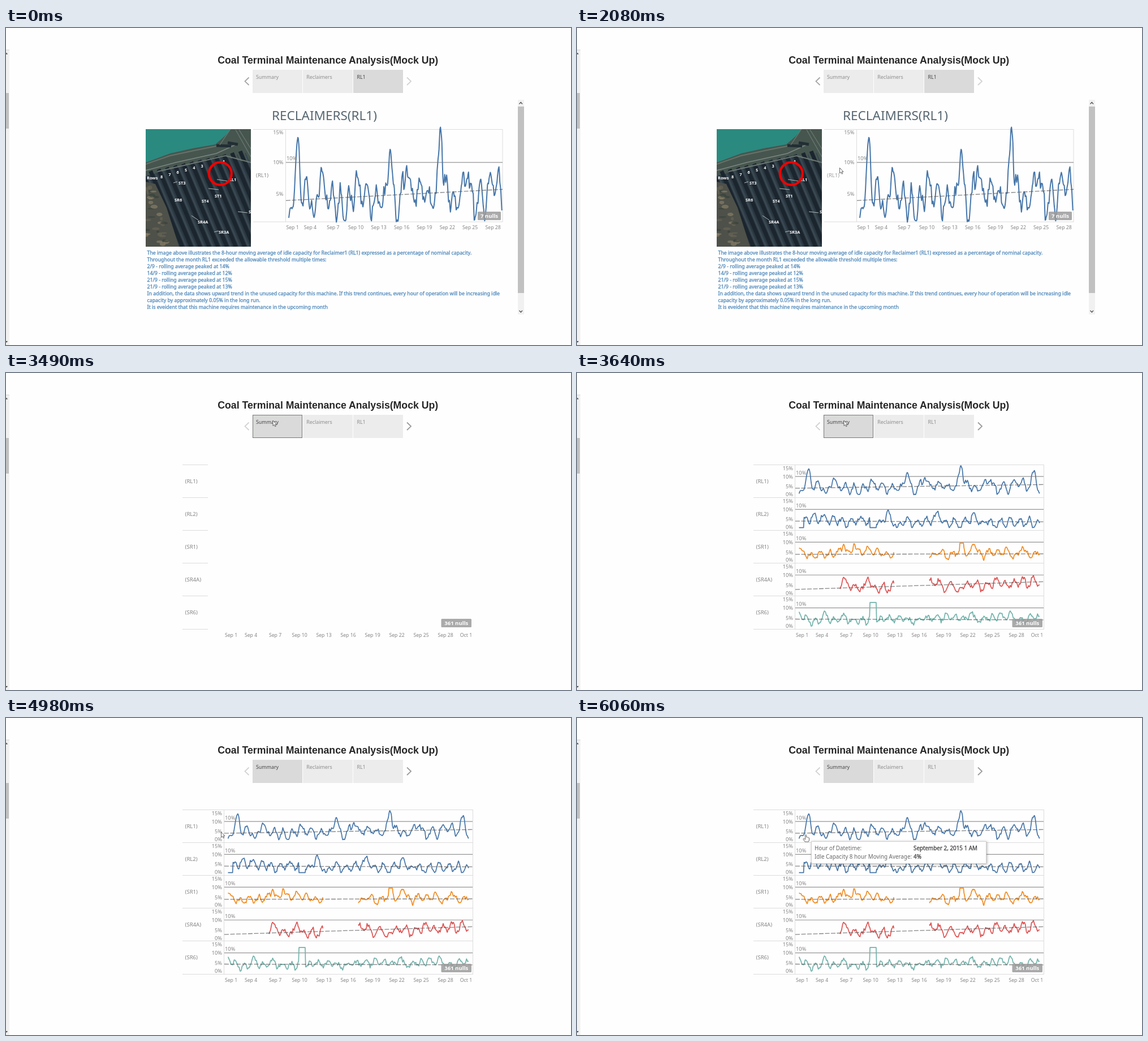
Write an HTML page that moves like this. It is 999 px wide and 561 px high and loops after 8000 ms.

```html
<!DOCTYPE html>
<html lang="en">
<head>
<meta charset="utf-8">
<title>Maintenance dashboard</title>
<style>
html, body { margin: 0; width: 100%; height: 100%; overflow: hidden; background: #fefefe; }
svg { display: block; width: 999px; height: 561px; }
text { font-family: "Noto Sans", "Open Sans", sans-serif; font-size: 8.7px; fill: #858585; white-space: pre; }
.title { font: bold 17.68px "Liberation Sans", Arial, sans-serif; fill: #262626; }
.head { font-size: 22.5px; fill: #566670; }
.tab { font-size: 8.9px; }
.row { font-size: 9.6px; }
.axis { font-size: 9.3px; }
.note { font-size: 8.8px; fill: #5089bb; stroke: #5089bb; stroke-width: .3px; }
.map { font-size: 7.4px; font-weight: bold; fill: #fff; }
.badge { font-size: 9.6px; font-weight: bold; fill: #fff; }
.tip { font-size: 9.85px; fill: #666; }
.strong { fill: #444; stroke: #444; stroke-width: .3px; }
</style>
</head>
<body>
<svg id="stage" viewBox="0 0 999 561"></svg>
<script>
const LOOP = 8000, GRID = '#dcdcdc';
const stage = document.getElementById('stage');

function el(tag, attrs, parent = stage) {
  const node = document.createElementNS('http://www.w3.org/2000/svg', tag);
  for (const k in attrs) node.setAttribute(k, attrs[k]);
  return parent.appendChild(node);
}
const group = parent => el('g', {}, parent);
const rect = (p, x, y, w, h, fill, more) => el('rect', { x, y, width: w, height: h, fill, ...more }, p);
const path = (p, d, stroke, width = 1, more) =>
  el('path', { d, fill: 'none', stroke, 'stroke-width': width, ...more }, p);
const shape = (p, d, fill) => el('path', { d, fill }, p);
function text(p, str, x, y, cls = '', anchor = 'start') {
  const node = el('text', { x, y, class: cls, 'text-anchor': anchor }, p);
  node.textContent = str;
  return node;
}
const show = (node, on) => node.style.display = on ? '' : 'none';
const mix = (a, b, f) => a + (b - a) * f;

function hash(i, seed) {
  const v = Math.sin(i * 127.1 + seed * 311.7) * 43758.5453;
  return v - Math.floor(v);
}
function noise(x, seed) {
  const i = Math.floor(x);
  return mix(hash(i, seed), hash(i + 1, seed), x - i) - .5;
}

// keys: [day, percent] turning points; flats: [from, to, percent]; gaps: [from, to]
const series = [
  { name: 'RL1', color: '#4676a9', seed: 1, trend: [3.9, 5.8], flats: [], gaps: [],
    keys: [[0, 1.9], [1.15, 14.5], [3.3, .8], [4.4, 9.4], [7.3, 1], [9, 8.4], [13.35, 12.3], [14.2, .6],
      [15.5, 8.8], [19.95, 15.8], [22.1, 2.4], [23.5, 8], [24.5, .8], [25.75, .7], [26.4, 8], [28.95, 13.4], [29.6, 1.5]] },
  { name: 'RL2', color: '#4676a9', seed: 2, trend: [3.85, 3.46], flats: [[0, .6, .4], [8.75, 9.55, .4]], gaps: [],
    keys: [[1.8, 7.5], [3, 7.4], [11, 9], [12.1, 1], [17, 9], [19.8, .7], [21.5, 8.5], [24.1, .5]] },
  { name: 'SR1', color: '#f28c22', seed: 3, trend: [3.65, 3.9], flats: [[19.8, 20.3, 9.5]], gaps: [[11.7, 16]],
    keys: [[0, 7.5], [5.5, 8], [6.8, 8.4], [8.5, 7.4], [20.1, 9], [21.5, 9], [25.5, 7.5], [27.5, 7]] },
  { name: 'SR4A', color: '#dd5353', seed: 4, trend: [2.5, 6.5], flats: [], gaps: [[0, 5.05], [11.7, 16]],
    keys: [[5.05, 1], [5.5, 8.6], [8.5, 8], [11, 1.5], [16.1, 8], [18, 1.5], [19.5, 1], [22.5, 1.5]] },
  { name: 'SR6', color: '#72b3ab', seed: 5, trend: [4.1, 3.7], flats: [[8.75, 9.55, 12.8]], gaps: [],
    keys: [[0, 7.5], [3.2, 7.8], [9.1, 12], [21.2, 8], [24.7, 7.6], [26, 8.5], [29.5, 6]] }
];
const within = (ranges, d) => ranges.find(([a, b]) => d >= a && d <= b);

// Idle capacity in percent on a given day: trend, daily swing, noise
function capacity({ seed, trend, keys, flats }, d) {
  const flat = within(flats, d);
  if (flat) return flat[2];
  let v = mix(...trend, d / 30) + 1.7 * Math.sin(2 * Math.PI * (d * .87 + seed * .3)) + 3.2 * noise(d * 2.6, seed);
  for (const [day, top] of keys) v = mix(v, top, Math.exp(-(((d - day) / .32) ** 2)));
  v += 2.2 * noise(d * 8, seed + 9);
  return .4 + Math.abs(v - .4);
}
function curve(s, x0, perDay, zero, unit, lastDay) {
  let d = '', pen = 'M';
  for (let h = 0; h <= lastDay * 16; h++) {
    const day = h / 16;
    if (within(s.gaps, day)) { pen = 'M'; continue; }
    d += pen + (x0 + day * perDay).toFixed(1) + ' ' + (zero - capacity(s, day) * unit).toFixed(1);
    pen = 'L';
  }
  return d;
}
function plot(p, s, [x0, perDay, lastDay], [left, right], zero, unit, width) {
  path(p, curve(s, x0, perDay, zero, unit, lastDay), s.color, width, { 'stroke-linejoin': 'round' });
  const y = x => zero - unit * mix(...s.trend, (x - x0) / perDay / 30);
  path(p, `M${left} ${y(left)}L${right} ${y(right)}`, '#555', 1.3, { 'stroke-dasharray': '8 2.5', opacity: .7 });
}
function badge(p, str, x, y, w) {
  rect(p, x, y, w, 15, '#9c9c9c', { rx: 1.5, opacity: .85 });
  text(p, str, x + w / 2, y + 11, 'badge', 'middle');
}
// The first date is pushed right to stay inside the axis
function dates(p, count, x, step, nudge, y) {
  for (let i = 0; i < count; i++)
    text(p, 'Sep ' + (1 + 3 * i), x + step * i + (i ? 0 : nudge), y, '', 'middle');
}

// Page frame
rect(stage, 0, 38, 6, 523, '#f1f1f1');
rect(stage, 0, 38.5, 6, 1, '#d8d8d8');
rect(stage, 0, 115, 5, 63, '#c1c1c1');
shape(stage, 'M-1 46.5L1 43.5L3 46.5Z M-1 554L1 557L3 554Z', '#505050');
text(stage, 'Coal Terminal Maintenance Analysis(Mock Up)', 374.3, 63, 'title');

const tabs = ['Summary', 'Reclaimers', 'RL1'].map((name, i) => ({
  box: rect(stage, 436 + 89 * i, 74, 88, 41, '#ececec'),
  label: text(stage, name, 442 + 89.2 * i, 90, 'tab')
}));
const prev = path(stage, 'M429.5 87.5L422.5 94.3L429.5 101', '#aaa', 1.8);
const next = path(stage, 'M709 87.5L716 94.3L709 101', '#ccc', 1.8);
const hover = rect(stage, 436.5, 74.5, 87, 40, 'none', { stroke: '#777' });

// Detail view
const detail = group();
text(detail, 'RECLAIMERS(RL1)', 470, 163, 'head');
rect(detail, 905, 127, 11, 380, '#f1f1f1');
rect(detail, 905, 139, 11, 330, '#c1c1c1');
path(detail, 'M907.5 134.5L910.3 131.5L913 134.5M907.5 500L910.3 503L913 500', '#505050', 1.3);

function aerial(p) {
  const clip = el('clipPath', { id: 'photo' }, p);
  rect(clip, 247, 179, 186, 208, '#000');
  const g = el('g', { 'clip-path': 'url(#photo)' }, p);
  rect(g, 247, 179, 186, 208, '#2b3842');
  shape(g, 'M247 179H433V240L380 226L247 262Z', '#46564f');
  shape(g, 'M247 179H398L386 192L370 206L330 213L290 222L247 238Z', '#2a8a80');
  path(g, 'M247 241L290 226L332 217L372 209', '#68736a', 2);
  path(g, 'M247 252L300 238L372 222L405 207', '#7d8783', 1.5);
  path(g, 'M372 208L398 209M392 203L410 206', '#222e34', 5);
  path(g, 'M396 180L378 207M406 180L433 228M412 180L433 214', '#6c7872', 1.3);
  for (let k = -3; k < 11; k++) {
    const x = 270 + 14.4 * k, y = 250 - 3.2 * k, run = `l${(387 - y) * .42} ${387 - y}`;
    path(g, `M${x} ${y}${run}`, '#1b252e', 7);
    path(g, `M${x + 6} ${y}${run}`, '#48555d', 1);
    path(g, `M${x + 9} ${y + 3}${run}`, '#384650', 2);
  }
  shape(g, 'M247 272L264 276L284 318L306 387H247Z', '#4e5149');
  for (let i = 0; i < 34; i++) {
    const y = 278 + hash(i, 1) * 106, x = 247 + hash(i, 2) * (12 + (y - 278) * .34);
    el('ellipse', { cx: x, cy: y, rx: 2 + hash(i, 3) * 5, ry: 1 + hash(i, 4) * 3,
      fill: ['#8a7f68', '#344039', '#686656'][i % 3], opacity: .65 }, g);
  }
  path(g, 'M268 254L388 226L433 238', '#6c7773', 2);
  path(g, 'M373 268L392 271M358 284L376 286M296 274L303 272M328 332L340 340M368 361L376 359M410 325L427 327', '#b4bcba', 1);
  const marks = { Rows: [249, 268], ST3: [305, 277], SR6: [298, 307], ST4: [346, 309], ST1: [369, 300],
    SR4A: [339, 346], SR3A: [376, 364], RL1: [394, 271], S: [429, 328] };
  for (const name in marks) text(g, name, ...marks[name], 'map');
  for (let n = 8; n > 2; n--) text(g, n, 273 + (8 - n) * 14.3, 266 - (8 - n) * 3.9, 'map');
  text(g, '1', 383, 239, 'map');
  el('circle', { cx: 378.8, cy: 257.7, r: 20, fill: 'none', stroke: '#f00000', 'stroke-width': 4.2 }, g);
}
aerial(detail);

path(detail, 'M437 179.5H878.5M437 343H878.5M494.5 180V343M878 180V343', GRID);
path(detail, 'M495 237.8H878', '#959595', 1.2);
plot(detail, series[0], [500, 13.45, 28.1], [495, 878], 348, 11, 2);
[[15, 188], [10, 241], [5, 296.5]].forEach(([n, y]) => text(detail, n + '%', 490.5, y, 'axis', 'end'));
text(detail, '10%', 496, 234, 'axis');
const rowName = text(detail, '(RL1)', 442, 264, 'row');
dates(detail, 10, 497.5, 40.4, 9, 356);
badge(detail, '7 nulls', 834, 325, 41);
['The image above illustrates the 8-hour moving average of idle capacity for Reclaimer1 (RL1) expressed as a percentage of nominal capacity.',
  'Throughout the month RL1 exceeded the allowable threshold multiple times:',
  '2/9 - rolling average peaked at 14%',
  '14/9 - rolling average peaked at 12%',
  '21/9 - rolling average peaked at 15%',
  '21/9 - rolling average peaked at 13%',
  'In addition, the data shows upward trend in the unused capacity for this machine. If this trend continues, every hour of operation will be increasing idle',
  'capacity by approximately 0.05% in the long run.',
  'It is eveident that this machine requires maintenance in the upcoming month'
].forEach((line, i) => text(detail, line, 249.5, 401 + 12.05 * i, 'note'));

// Summary view
const summary = group(), charts = group(summary);
series.forEach((s, i) => {
  const top = 163 + 58.1 * i, edge = Math.round(top) - .5;
  path(summary, `M312 ${edge}H357`, GRID, 1.2);
  text(summary, `(${s.name})`, 316.5, top + 32, 'row');
  path(charts, `M357 ${edge}H826`, GRID, 1.2);
  path(charts, `M386 ${top + 20.2}H826`, '#959595', 1.2);
  plot(charts, s, [392.5, 14.36, 29.65], [386, 826], top + 54, 3.38, 1.7);
  [[15, 9], [10, 24], [5, 41.3], [0, 55.2]].forEach(([n, dy]) =>
    text(charts, n + '%', 382, top + dy, 'axis', 'end'));
  text(charts, '10%', 387, top + 17, 'axis');
});
path(summary, 'M312 453.5H357', GRID, 1.2);
path(charts, 'M357 453.5H826M385.5 163V453M825.5 163V453', GRID);
dates(summary, 10, 390, 43, 8, 466.7);
text(summary, 'Oct 1', 813.5, 466.7, '', 'middle');
badge(summary, '361 nulls', 769.5, 435, 53.5);

// Tooltips, drawn at their own origin
function tooltip(w, h) {
  const g = group();
  rect(g, .5, .5, w - 1, h - 1, '#fff',
    { stroke: '#cfcfcf', style: 'filter:drop-shadow(1px 1px 2px rgba(0,0,0,.3))' });
  return g;
}
const trendTip = tooltip(390, 52);
['Idle Capacity Moving Average = 0.000577521*Hour of Datetime (RL1) + -24.3595',
  'R-Squared: 0.0415958', 'P-value: < 0.0001'
].forEach((line, i) => text(trendTip, line, 5.5, 16 + 14.2 * i, 'tip'));

const pointTip = tooltip(310, 40);
text(pointTip, 'Hour of Datetime:', 6, 16.3, 'tip');
text(pointTip, 'September 2, 2015 1 AM', 181, 16.3, 'tip strong');
text(pointTip, 'Idle Capacity 8 hour Moving Average:', 6, 30.6, 'tip');
text(pointTip, '4%', 181, 30.6, 'tip strong');

// Pointers
const ink = { stroke: '#555', 'stroke-width': .9, 'stroke-linejoin': 'round', fill: '#fff' };
const arrow = el('path', { d: 'M.5 .5V10L2.7 8L4.3 11.3L5.8 10.6L4.3 7.4H7Z', ...ink });
const hand = el('path', {
  d: 'M-1 1Q0-.4 1 1V5Q2 4 3 5.2Q4 4.5 4.8 5.8Q6 5.4 6 7V10L5 13H-1.5L-4.5 8.5Q-4.5 7-3 7.5L-1 9Z', ...ink });

// Strokes of the pointer: start and end time, start and end place
const moves = [
  [1210, 1450, [664, 496], [502, 426]],
  [2080, 2160, [464, 247], [466, 187]],
  [2390, 2620, [468, 132], [474, 87]],
  [2870, 3050, [473, 86], [471.5, 83.5]],
  [4260, 4580, [469, 96], [443, 168]],
  [4670, 4740, [424, 188], [403, 203]],
  [4820, 5040, [403, 203], [368.5, 200.5]],
  [5660, 5760, [389, 207], [392, 210]],
  [5820, 6060, [397, 209], [404.5, 206]]
];
function pointer(t) {
  const move = moves.filter(m => m[0] <= t).pop();
  if (!move) return null;
  const [start, end, from, to] = move;
  const count = Math.max(1, Math.round((end - start) / 80));
  const f = Math.min(1, Math.floor((t - start) / (end - start) * count + 1e-6) / count);
  return from.map((v, i) => mix(v, to[i], f));
}

function draw(t) {
  const done = t >= 3490;
  show(detail, !done);
  show(summary, done);
  show(charts, t >= 3640);
  show(hover, t >= 2470 && t < 4340);
  tabs.forEach(({ box, label }, i) => {
    const on = i === (done ? 0 : 2);
    box.setAttribute('fill', on ? '#d9dad9' : '#ececec');
    label.style.fill = on ? '#444' : '#8c8c8c';
  });
  prev.setAttribute('stroke', done ? '#d2d2d2' : '#a5a5a5');
  next.setAttribute('stroke', done ? '#9a9a9a' : '#d2d2d2');
  rowName.style.fill = t >= 2080 && t < 2390 ? '#a0a0a0' : '#858585';

  const at = pointer(t);
  const onTrend = t >= 5660 && t < 5900;
  const onPoint = t >= 5900 || (t >= 4740 && t < 4900);
  show(arrow, at && !onPoint);
  show(hand, onPoint);
  show(trendTip, onTrend);
  show(pointTip, onPoint);
  if (!at) return;
  const [x, y] = at, place = (node, dx, dy) => node.setAttribute('transform', `translate(${x + dx} ${y + dy})`);
  place(arrow, 0, 0);
  place(hand, 0, 0);
  place(trendTip, 9, 13);
  place(pointTip, 9.5, 12);
}

function tick() {
  draw(performance.now() % LOOP);
  requestAnimationFrame(tick);
}
tick();
</script>
</body>
</html>
```
